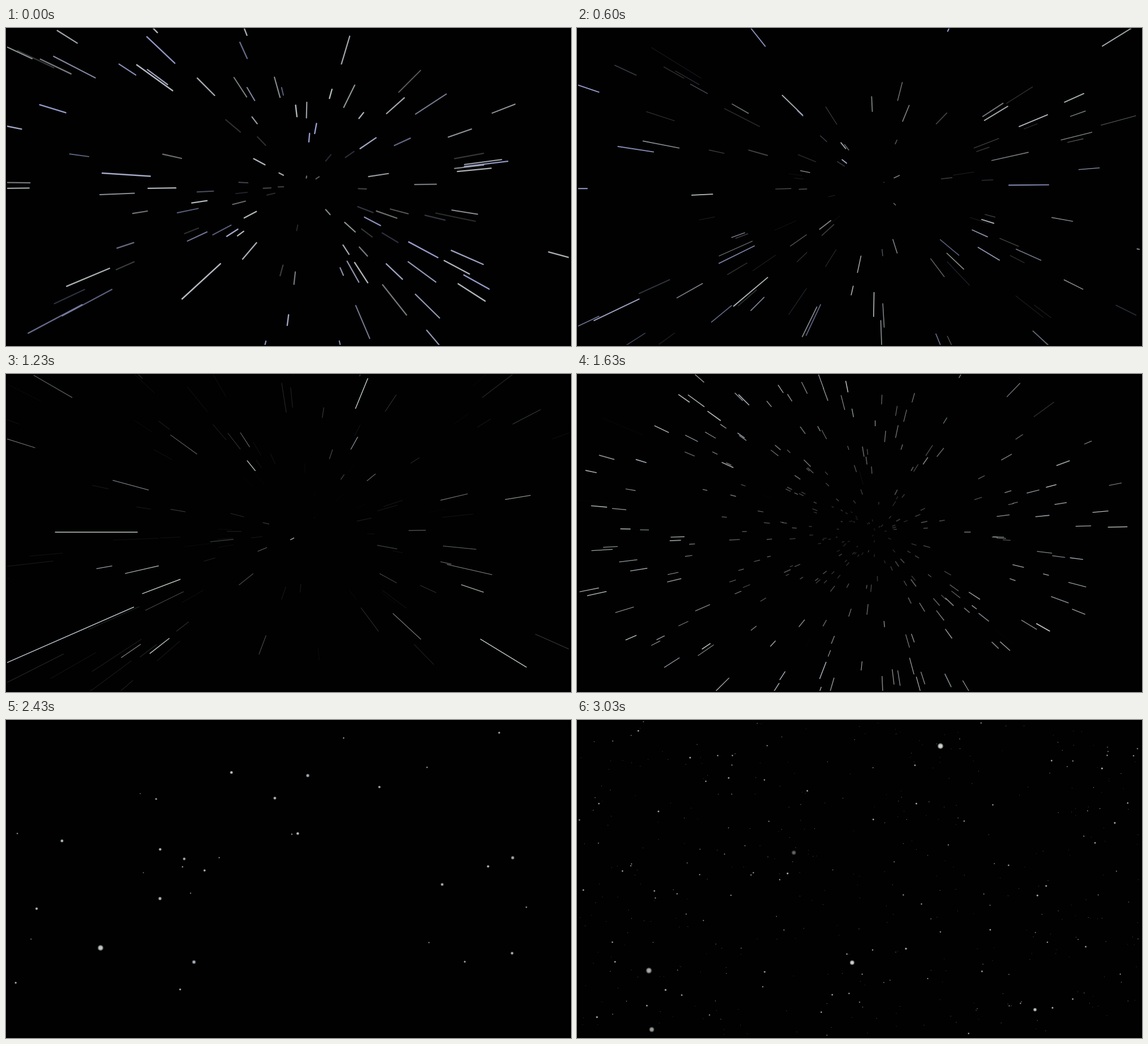
Animation, 998 px wide and 561 px high, one loop 3.06 s. Source, as an HTML page with a canvas:

```html
<!DOCTYPE html>
<html lang="en">
<head>
<meta charset="utf-8">
<title>Star warp</title>
<style>
  html, body { margin: 0; width: 100%; height: 100%; overflow: hidden; background: #000; }
  canvas { display: block; width: 998px; height: 561px; }
</style>
</head>
<body>
<canvas id="sky" width="998" height="561"></canvas>
<script>
const ctx = document.getElementById('sky').getContext('2d');
const LOOP = 3060, STEP = 100 / 3, LAST = 91;
const CX = 528, CY = 279;       // vanishing point
const ARRIVE = 49;              // step at which warp has nearly ended
const BLUISH = ['#adb3d2', '#bcc3c6', '#a4aadd', '#c0c5cd'];
const PALE = ['#c9d2cb', '#d2d7d2', '#bcc4cc'];

let seed = 71;
function rand(a = 0, b = 1) {
  seed = (seed * 1664525 + 1013904223) >>> 0;
  return a + (b - a) * seed / 4294967296;
}
const pick = list => list[Math.floor(rand(0, list.length))];
const ramp = (v, a, b) => Math.min(1, Math.max(0, (v - a) / (b - a)));
const fromCentre = (x, y) => Math.hypot(x - CX, y - CY);

// (x, y) is the outer end at step `at`; each step scales the radius by `grow`.
function makeStreak(x, y, len, at, alpha, width, tints, slow = false) {
  const r = fromCentre(x, y);
  return { ux: (x - CX) / r, uy: (y - CY) / r, r, grow: r / (r - len),
    at, alpha, width, slow, tint: pick(tints) };
}

const streaks = [];

// Warp: lines get thinner, and more of them faint, as time goes on.
const warpWidth = at => 2.4 - 0.9 * ramp(at, 0, 37);
const warpTints = at => at < 20 ? BLUISH : PALE;

for (let at = -4; at < 46; at++) {
  const gloom = 0.15 + (Math.max(0, at) / 24) ** 2;
  for (let i = 0; i < 15; i++) {
    const x = rand(0, 998), y = rand(0, 561), r = fromCentre(x, y);
    const light = rand() ** gloom;
    streaks.push(makeStreak(x, y, r * rand(0.07, 0.24), at, 0.1 + 0.85 * light,
      warpWidth(at) * (0.5 + 0.5 * light), warpTints(at)));
  }
}

// The most prominent streaks: x, y, length, step.
const leaders = [
  [170, 256, 85, 0], [311, 478, 92, 0], [231, 65, 78, 0],
  [835, 40, 198, 11], [62, 458, 129, 11], [37, 217, 121, 11],
  [970, 118, 108, 25], [33, 1, 89, 25],
  [87, 279, 145, 37], [2, 509, 244, 37], [639, 8, 57, 37]
];
for (const [x, y, len, at] of leaders)
  streaks.push(makeStreak(x, y, len, at, 0.95, warpWidth(at), warpTints(at)));

// Slowing down: a crowd of short streaks, brighter away from the centre.
for (let i = 0; i < 290; i++) {
  const angle = rand(0, 2 * Math.PI), r = 25 + 440 * rand() ** 1.15;
  const light = 0.2 + 0.65 * ramp(r, 40, 380);
  streaks.push(makeStreak(CX - 35 + 1.12 * r * Math.cos(angle), CY + 0.74 * r * Math.sin(angle),
    1 + r * rand(0.025, 0.085), ARRIVE, light * rand(0.7, 1.15), rand(1.1, 1.8), PALE, true));
}

// Near stars drift alone, then the far field fades in behind them.
function makeDot(x, y, r, alpha) {
  return { x, y, r, alpha, tint: pick(PALE) };
}
function scatter(count, size, alpha) {
  return Array.from({ length: count }, () => {
    const k = rand();
    return makeDot(rand(4, 992), rand(2, 558), size(k), alpha(k));
  });
}
const near = [
  makeDot(167, 402, 5, 0.85), makeDot(332, 427, 3.2, 0.85), makeDot(895, 243, 3, 0.7),
  makeDot(533, 98, 3, 0.8), makeDot(272, 315, 2.9, 0.9),
  ...scatter(29, k => 0.8 + 2 * k ** 0.7, k => 0.55 + 0.35 * k)
];
const far = [
  makeDot(642, 46, 5, 0.95), makeDot(486, 428, 4, 0.95), makeDot(127, 442, 5.2, 0.65),
  makeDot(132, 546, 4.6, 0.6), makeDot(383, 234, 4, 0.35), makeDot(809, 511, 3.1, 0.9),
  ...scatter(460, k => 0.65 + 1.2 * k ** 5, k => 0.22 + 0.6 * k * k)
];

function drawStreak(s, f) {
  let n = f - s.at, pace = 1, fade;
  if (s.slow) {
    pace = Math.exp(-n / 5);
    n = 5 * (1 - pace);
    fade = ramp(f, 42, 49) * (1 - ramp(f, 53, 66));
  } else {
    fade = ramp(n, -5, -2) * (1 - ramp(n, 2, 5));
  }
  const r2 = s.r * s.grow ** n, r1 = r2 / s.grow ** pace;
  if (fade <= 0 || r1 > 620) return;
  ctx.globalAlpha = Math.min(1, s.alpha * fade);
  ctx.strokeStyle = s.tint;
  ctx.lineWidth = s.width;
  ctx.beginPath();
  ctx.moveTo(CX + s.ux * r1, CY + s.uy * r1);
  ctx.lineTo(CX + s.ux * r2, CY + s.uy * r2);
  ctx.stroke();
}

function disc(x, y, r) {
  ctx.beginPath();
  ctx.arc(x, y, r, 0, 2 * Math.PI);
  ctx.fill();
}

function drawDots(dots, fade, zoom) {
  if (fade <= 0) return;
  for (const d of dots) {
    const x = CX + (d.x - CX) * zoom, y = CY + (d.y - CY) * zoom;
    ctx.fillStyle = d.tint;
    ctx.globalAlpha = d.alpha * fade * 0.6;
    disc(x, y, d.r);
    ctx.globalAlpha = d.alpha * fade;
    disc(x, y, d.r * 0.65);
  }
}

function draw(f) {
  ctx.globalAlpha = 1;
  ctx.fillStyle = '#000';
  ctx.fillRect(0, 0, 998, 561);
  ctx.save();
  ctx.beginPath();
  ctx.rect(2, 1, 992, 558);
  ctx.clip();
  ctx.fillStyle = '#000100';
  ctx.fillRect(2, 1, 992, 558);
  for (const s of streaks) drawStreak(s, f);
  drawDots(near, ramp(f, 61, 71) * (1 - ramp(f, 75, 86)), 1 + 0.005 * (f - 73));
  drawDots(far, ramp(f, 76, 89), 1 + 0.003 * (f - LAST));
  ctx.restore();
}

const start = performance.now();
function tick() {
  const t = (performance.now() - start) % LOOP;
  draw(Math.min(LAST, Math.floor((t + 5) / STEP)));
  requestAnimationFrame(tick);
}
ctx.lineCap = 'round';
tick();
</script>
</body>
</html>
```
